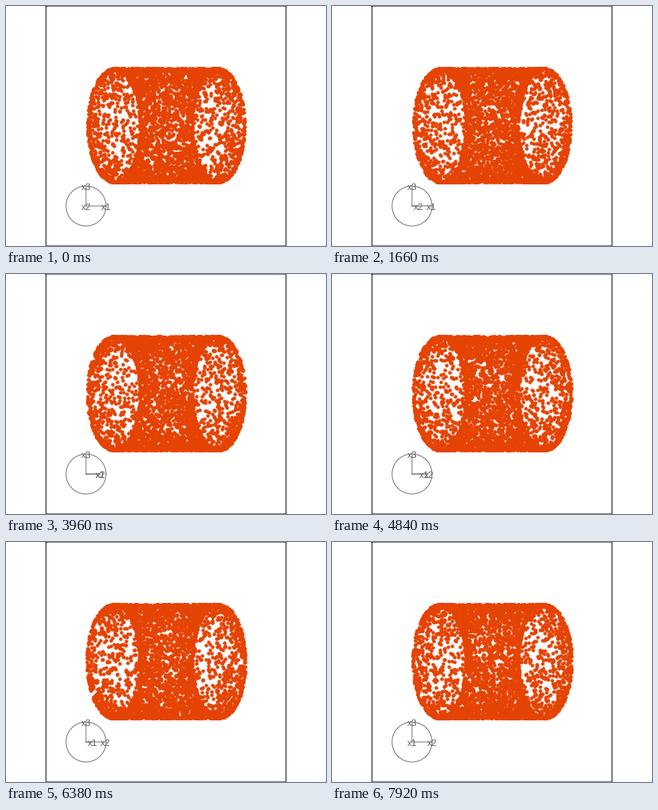
Animation, 400 px wide and 300 px high, one loop 8 s. Source, as a matplotlib script:

```python
import numpy as np
import matplotlib.pyplot as plt
from matplotlib.animation import FuncAnimation

WIDTH, HEIGHT, DPI = 400, 300, 100
PX = 72 / DPI                      # points per pixel
LOOP_MS, TICK_MS = 8000, 20
STEPS = 108                        # rotation steps in a quarter turn
DOT, GREY, LABEL = "#E54304", "#787878", "#686868"
CENTER = np.array([200.1, 149.2])
AXES_X, AXES_Y, AXES_R = 100, 250, 25

plt.rcParams["font.family"] = "Liberation Sans"
plt.rcParams["text.hinting"] = "none"
fig = plt.figure(figsize=(WIDTH / DPI, HEIGHT / DPI), dpi=DPI, facecolor="white")
ax = fig.add_axes([0, 0, 1, 1])
ax.set_xlim(0, WIDTH)
ax.set_ylim(HEIGHT, 0)
ax.axis("off")

# Torus sampled uniformly in both angles, major radius twice the tube radius.
rng = np.random.default_rng(7)
theta, phi = rng.uniform(0, 2 * np.pi, (2, 4500))
ring = 2 + np.cos(phi)
x1 = 32.7 * ring * np.cos(theta)
x2 = 33.1 * ring * np.sin(theta)
x3 = 70.9 * np.sin(phi)


def line(xs, ys, color, **kw):
    """One-pixel line kept on its exact coordinates."""
    return ax.plot(xs, ys, color=color, lw=PX, snap=False, **kw)[0]


def label(text, x, y):
    return ax.text(x + 0.4, y + 5, text, color=LABEL, fontsize=12 * PX,
                   ha="center", va="baseline", zorder=5)


line([50, 350, 350, 50, 50], [0, 0, 300, 300, 0], "black")
dots, = ax.plot([], [], "o", color=DOT, ms=4.5 * PX, mew=0, zorder=3)

turn = np.linspace(0, 2 * np.pi, 121)
line(AXES_X + AXES_R * np.cos(turn), AXES_Y + AXES_R * np.sin(turn), GREY, zorder=4)
line([AXES_X, AXES_X], [AXES_Y, AXES_Y - AXES_R], GREY, zorder=4)
spokes = [line([], [], GREY, zorder=4) for _ in range(2)]
tips = [label(name, AXES_X, AXES_Y) for name in ("x1", "x2")]
label("x3", AXES_X, AXES_Y - AXES_R)


def step_at(ms):
    """Steps follow a repeating rhythm of 20, 100 and 100 ms."""
    if ms < 100:
        return 0
    cycle, rest = divmod(ms - 100, 220)
    return 1 + 3 * cycle + (rest >= 20) + (rest >= 120)


def update(i):
    angle = np.pi / 2 * step_at(i * TICK_MS) / STEPS
    weights = np.cos(angle), np.sin(angle)
    dots.set_data(CENTER[0] + weights[0] * x1 + weights[1] * x2, CENTER[1] - x3)
    for w, spoke, tip in zip(weights, spokes, tips):
        end = AXES_X + AXES_R * w
        spoke.set_data([AXES_X, end], [AXES_Y, AXES_Y])
        tip.set_x(end + 0.4)
    return dots, *spokes, *tips


anim = FuncAnimation(fig, update, frames=LOOP_MS // TICK_MS, interval=TICK_MS,
                     repeat=True, repeat_delay=0)
plt.show()
```
